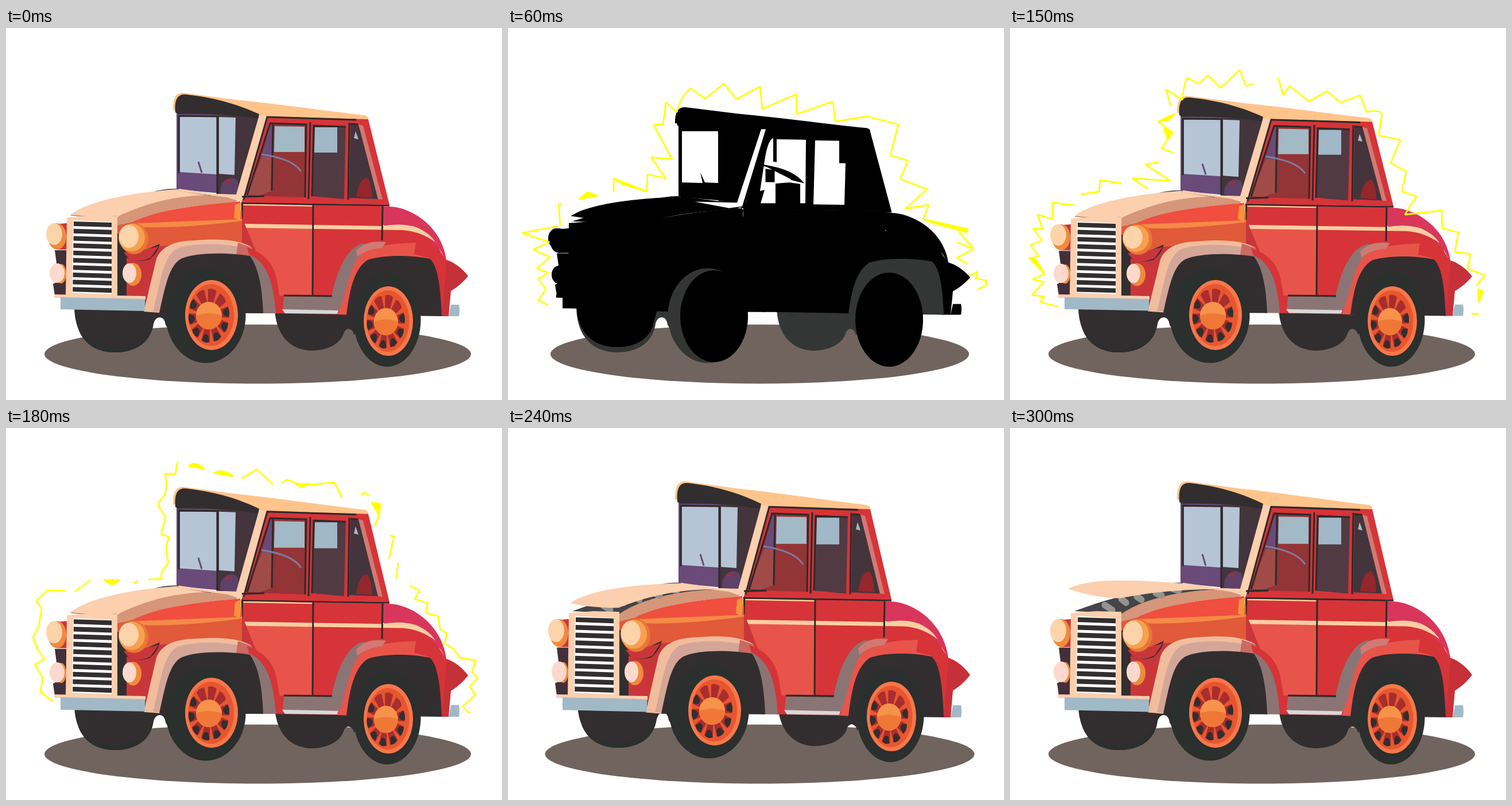
Animation, 864 px wide and 648 px high, one loop 330 ms. Source, as an HTML page:

```html
<!DOCTYPE html>
<html lang="en">
<head>
<meta charset="utf-8">
<title>Bouncing car</title>
<style>
html,body{margin:0;width:100%;height:100%;overflow:hidden;background:#fff}
svg{display:block;width:864px;height:648px}
.line{fill:none;stroke:#2e292a;stroke-width:3}
.dark{fill:#322e2f}
.peach{fill:#fccfae}
.red{fill:#d63438}
.light{fill:#e8544a}
.sky{fill:#b5c5d6}
.burst{fill:none;stroke:#ff0;stroke-width:2.8;stroke-linejoin:bevel}
.burst .solid{fill:#ff0}
#glass,.flat .rims,.blob{display:none}
.flat .blob{display:block}
.flat .far,.flat .tyre,.flat #rearArch{fill:#343635}
.flat #frontArch{fill:#000}
.shade #paint{filter:brightness(0)}
.shade #glass{display:block}
</style>
</head>
<body>
<svg id="stage" viewBox="0 0 864 648">
<ellipse id="shadow" cx="438.5" cy="568" ry="51.5" fill="#71645e"/>
<g id="farWheels">
  <path class="far dark" d="M119 484C119 540 150 565 190 565C228 565 253 546 257 515Q260 504 268 504Q276 504 278 517L292 540L300 484Z"/>
  <path class="far dark" d="M468 488C470 540 500 562 533 562C562 562 582 548 587 535Q590 524 597 524Q605 526 606 535L640 488Z"/>
  <path class="rims" d="M126 525Q148 557 190 557Q232 556 254 522C247 552 222 565 190 565Q142 565 126 525" fill="#2b2f2d"/>
  <path class="blob" d="M120 484C120 532 150 556 190 556C226 556 250 538 254 512L262 484Z"/>
</g>
<g id="body">
 <g id="paint">
  <!-- tail and doors -->
  <path fill="#c63038" d="M745 383L767 404C785 409 800 425 805 432C798 441 786 452 775 458L771 502L755 502Z"/>
  <path fill="#a1b9c6" d="M775 482H789Q791 492 789 502H771Z"/>
  <path class="red" d="M410 303L655 309V345Q725 347 757 390L768 405L759 501L590 499L470 497L411 390Z"/>
  <path fill="#d9365b" d="M656 310L668 311C705 312 760 345 767 405L755 385Q728 372 690 370L656 342Z"/>
  <path class="red" d="M656 345L690 351Q715 355 735 366L752 382L656 374Z"/>
  <path class="light" d="M411 345L534 348V466H470L411 385Z"/>
  <path fill="#fdcfa0" d="M411 341L655 345Q690 339 715 347Q738 357 748 373Q722 354 690 352L411 348ZM413 306L534 309V311L413 309Z"/>
  <path fill="#8b7574" d="M484 468L567 468C575 430 590 384 622 375L640 378C610 400 605 440 585 492H482Z"/>
  <path fill="#d8d8d8" d="M481 490L579 492L577 498L486 497Z"/>
  <path class="light" d="M578 499C592 465 596 430 610 405C625 384 650 376 714 374L740 405L600 500Z"/>
  <path fill="#cf7b74" d="M610 388C625 373 640 371 662 373L655 383C640 384 625 388 612 399Z"/>
  <path class="red" d="M714 374Q740 376 754 383L762 401L735 400L711 394Z"/>
  <path class="line" d="M411 305L668 309M535 306L534 466M656 309L655 370M412 293L410 371M484 466L568 467"/>

  <!-- hood side -->
  <path fill="#c9363a" d="M190 340L411 330L440 400L310 410L260 490H190Z"/>
  <path fill="#e15a39" d="M190 334L411 318V376L300 378L264 380L240 390L195 390Z"/>
  <path fill="#f04e3f" d="M215 335C265 318 335 307 408 302L411 333L250 341Z"/>
  <path fill="#f58a45" d="M228 340L411 333V336Q310 349 240 347Z"/>
  <path fill="#d5967a" d="M193 330C230 303 300 287 360 290L413 294L400 303C330 309 270 315 220 338L194 344Z"/>
  <path fill="#f8923c" d="M399 308L410 304L408 335L397 331Z"/>
  <path class="dark" d="M190 355L240 388L268 376Q264 392 250 403Q228 410 210 400V466H190Z"/>
  <path fill="#c9363a" d="M205 391Q240 388 266 380L252 400Q230 410 214 402Z"/>

  <!-- engine bay and lid -->
  <path fill="#454547" d="M247 288Q275 279 299 280L292 286Z"/>
  <g id="bay">
    <path fill="#454547" d="M112 327C190 299 250 288 330 288L362 291C290 294 230 308 195 331Z"/>
    <path d="M165 317L178 325M194 307L202 313M221 303L229 308M254 297L264 301M283 290L294 293" stroke="#939393" stroke-width="11" stroke-linecap="round"/>
  </g>
  <path id="lid" class="peach"/>
  <path id="seam" d="M113 326Q150 331 193 328M299 283Q325 287 357 292" fill="none" stroke="#5a4b45" stroke-width=".8"/>

  <!-- front fender -->
  <path fill="#f1bd9c" d="M240 494L262 402C270 382 290 371 330 370C370 367 402 368 427 381L420 400L310 400L268 496Z"/>
  <path fill="#d3a698" d="M256 494C270 442 272 400 298 384C330 373 380 376 405 381L410 400L310 402L274 494Z"/>
  <path fill="#ca6a62" d="M404 374L428 382L434 399L401 395Z"/>
  <path class="red" d="M420 382Q462 396 471 435L482 497H466L440 420L424 396Z"/>
  <path fill="#8b7574" d="M424 395C450 406 466 435 470 497H444L434 430Z"/>

  <!-- lamps, grille, bumper -->
  <path fill="#c9363a" d="M82 342L106 340V386H88Z"/>
  <path fill="#41303a" d="M85 387H108V466H85L82 446L92 440Z"/>
  <ellipse cx="89" cy="363" rx="16" ry="23" fill="#f08a3c"/>
  <ellipse cx="84" cy="359" rx="14" ry="19" fill="#fdd3a9"/>
  <ellipse cx="96" cy="428" rx="9" ry="17" fill="#f08a3c"/>
  <ellipse cx="89" cy="427" rx="13" ry="17" fill="#fcd9cc"/>
  <path class="peach" d="M106 330L150 327L194 328V467L104 466Z"/>
  <g id="grille"></g>
  <ellipse cx="223" cy="367" rx="25" ry="27" fill="#e87735"/>
  <ellipse cx="219" cy="365" rx="23" ry="24" fill="#f8a050"/>
  <ellipse cx="214" cy="363" rx="17" ry="20" fill="#fdd3a9"/>
  <ellipse cx="221" cy="429" rx="15" ry="20" fill="#f08a3c"/>
  <ellipse cx="215" cy="427" rx="12" ry="17" fill="#fcd9cc"/>
  <path class="peach" d="M84 464L243 467V473L84 470Z"/>
  <path fill="#a1b9c6" d="M95 469L242 472V493L95 490Z"/>

  <!-- cabin front -->
  <path fill="#6a4a79" d="M297 146L440 153L405 291L297 281Z"/>
  <path fill="#44343b" d="M369 152L441 153L404 291L369 289Z"/>
  <path class="sky" d="M303 155H367V255L303 251ZM371 155L400 156L398 256L371 254Z"/>
  <path fill="#5e4168" d="M373 288C371 265 391 255 403 265L407 280L402 291Z"/>
  <ellipse cx="387" cy="267" rx="4" ry="3" fill="#a62b36"/>
  <path class="line" d="M301 253V153L370 154M368 153V289"/>
  <path d="M335 233L341 252" stroke="#6a4a79" stroke-width="3"/>
  <path fill="#fec48b" d="M291 143C291 121 296 113 309 113L400 125C480 133 560 145 625 152Q632 154 631 160L455 154L440 153Z"/>
  <path class="dark" d="M295 147C293 124 299 114 315 116C370 122 408 135 441 150L439 158C400 152 350 149 300 150Z"/>

  <!-- cabin side -->
  <path class="red" d="M453 154L631 159L668 308L411 304Z"/>
  <path class="peach" d="M441 152L455 154L411 303L385 295L300 284L301 280L365 289L401 290Z"/>
  <path fill="#933436" d="M461 167L523 169L521 295L419 292Z"/>
  <path fill="#a04b48" d="M446 224L463 225V284L440 292L419 290Z"/>
  <path fill="#6a4a79" d="M460 170L464 169V225L446 224Z"/>
  <path fill="#a2b9c6" d="M468 171L520 172V216H467Z"/>
  <path fill="#523a42" d="M537 171L592 172L589 298L532 293Z"/>
  <path fill="#a0b8c8" d="M538 173H577V217H537Z"/>
  <path fill="#44343b" d="M600 166L614 168L650 298L598 296Z"/>
  <path fill="#93272c" d="M610 294Q615 262 629 261Q637 268 638 296Z"/>
  <path fill="#a2b9c6" d="M609 180L614 194L606 192Z"/>
  <path fill="#cf7b74" d="M614 168L622 170L656 299L648 298Z"/>
  <path class="line" d="M414 299L455 155L610 160M465 168L463 284M598 165L596 299M530 164L527 298"/>
  <path class="line" stroke-width="2" d="M420 291L460 166L523 168L521 295M533 293L536 170L592 172M600 167L613 168M411 294L450 293"/>
  <path d="M445 220Q500 228 514 250" fill="none" stroke="#82789c" stroke-width="3"/>
 </g>
 <g id="glass" fill="#fff">
  <path d="M303 158H366V255L343 254L335 235L339 255L303 254ZM325 290L399 292L441 154H449L408 299L385 302ZM468 173L519 174L518 293H509V257L490 254L466 256V293H440L447 268L439 270L446 220Q452 173 462 171V215L468 216ZM535 175L577 176V218H588L586 296L532 295Z"/>
  <path d="M445 222Q494 230 512 253L493 248M450 230L463 232V252H450Z" stroke="#000" stroke-width="3" fill="#000"/>
 </g>
 <path id="frontArch" class="dark" d="M267 496C279 440 286 413 305 402C330 390 390 391 425 397C440 418 446 450 448 497Z"/>
 <path id="rearArch" class="dark" d="M593 500C598 460 605 420 630 404C655 395 705 395 738 402C752 413 757 450 759 502Z"/>
</g>
<g id="nearWheels">
  <ellipse class="tyre" cx="348" cy="501" rx="69.5" ry="82.5" fill="#2b2f2d"/>
  <ellipse class="tyre" cx="664" cy="508" rx="58.5" ry="82" fill="#2b2f2d"/>
  <g class="rims" id="rims"></g>
  <ellipse class="blob" cx="359" cy="502" rx="59" ry="80"/>
  <ellipse class="blob" cx="664" cy="508" rx="59" ry="82"/>
</g>
<g class="burst">
  <path d="M294 147L275 129L270 168L254 169L286 229L249 225L275 262L243 255L242 285L184 262V285M294 147Q300 120 318 105L343 123L376 97L398 124Q420 112 439 102L443 141L503 115V150L566 128L570 163L625 154L680 168L666 222L697 231L683 263L730 281L692 315L733 308L723 333M785 354L811 385L782 373M811 385L782 400L800 411M804 432L818 424L815 436L834 440L833 448L817 456M91 344L88 307L94 306M87 345L25 357L72 373L44 386L73 399L50 419L70 426L53 437L66 455L53 474L70 483"/>
  <path class="solid" d="M124 298L138 286L156 292ZM723 333L800 350V356L738 339ZM184 262L242 285L200 272Z"/>
</g>
<g class="burst">
  <path d="M280 136L272 107L300 125Q304 90 309 87L329 97L345 82L367 104L400 73L411 101L424 97M467 87L476 117L487 101L521 128L552 110L576 130L610 117L621 146Q645 142 648 150L642 187L680 195L663 235L690 250L683 285L708 293L688 325L752 318L753 349L781 356L775 390L802 394L797 419L827 431L812 449M804 498H817M286 150L258 163L283 182L264 210L284 217M260 233L236 238L279 266L213 262L240 280M195 271L157 265L155 285L123 290M112 309L74 304V333L48 325L57 350L40 349L56 370L36 378L50 397L33 402M60 428L39 438L59 442L38 465L60 468L53 478L83 485"/>
  <path class="solid" d="M815 455L824 458L817 478ZM268 175L283 182L275 194ZM33 400L45 403L60 428ZM258 163L287 150L276 161Z"/>
</g>
<g class="burst">
  <path d="M299 58L295 80L277 80Q283 105 274 120Q262 130 268 140L278 155L270 185L285 190Q275 205 283 235Q265 255 272 263L248 264M410 88L437 72L465 98M480 95L490 90L515 100L572 95L586 122M618 117L625 112L632 118M650 152L642 172M668 187L676 189L667 228M683 235L680 262M704 275L720 283L712 298L735 305L731 322L753 328L756 350L768 358L764 375L780 385L790 400L818 405L812 425L822 435L808 450L818 465L795 485L808 497M230 266L222 271M147 265L120 285M103 284L72 283L53 301L62 315L57 345L47 365L55 385L67 403L50 412L64 435L60 460L82 476"/>
  <path class="solid" d="M318 66Q330 57 345 71ZM362 78Q378 70 396 84ZM637 130L652 132L650 152ZM170 265H198L185 273ZM505 98L530 97L515 103Z"/>
</g>
</svg>
<script>
const $ = id => document.getElementById(id);
const bursts = document.querySelectorAll('.burst');

$('grille').innerHTML = '<path fill="#fff" d="M117 335L184 338V464L115 461Z"/>' +
  Array.from({length: 10}, (_, i) => {
    const x = 118 - i * .2, y = 337 + i * 12.7;
    return `<path class="dark" d="M${x} ${y}L184 ${y + 2}v8L${x} ${y + 8}Z"/>`;
  }).join('');

function rim(cx, cy, rx, ry) {
  const holes = Array.from({length: 10}, (_, i) => {
    const top = i < 2 || i > 8;
    const cap = top ? '' : '<path class="dark" d="M-9 -45Q0 -50 9 -45L5 -35Q0 -31 -5 -35Z"/>';
    return `<g transform="rotate(${i * 36 + 10})">
      <path fill="#a72d2f" d="M-10 -45Q0 -50 10 -45L6 -22H-6Z"/>${cap}</g>`;
  }).join('');
  return `<g transform="translate(${cx} ${cy}) scale(${rx / 61} ${ry / 61})">
    <circle r="61" fill="#f6774a"/>
    <ellipse cx="-1" rx="53" ry="54" fill="#e8562f"/>
    <g transform="translate(-6 1)">${holes}
      <ellipse rx="30" ry="24" fill="#f6924a"/>
      <path d="M-30 0Q0 -8 30 0C28 32 -28 32 -30 0" fill="#ef7836"/>
    </g></g>`;
}
$('rims').innerHTML = rim(358, 500, 46, 61) + rim(666, 510.5, 43, 60.5);

const base = {sx: 1, sy: 1, dy: 0, wx: 0, wy: 0, lift: 0, shadow: 371.5, burst: -1, look: ''};
const poses = [
  {at: 0},
  {at: 60, sy: .929, lift: 9, shadow: 364.5, burst: 0, look: 'flat shade'},
  {at: 120, sx: 1.011, sy: .925, dy: 6, lift: 14, shadow: 364.5, burst: 1, look: 'flat'},
  {at: 150, sy: .985, burst: 1},
  {at: 180, sy: 1.03, wy: -4, burst: 2},
  {at: 210, sy: 1.057, wx: 2, wy: -8, shadow: 374, burst: 2},
  {at: 240, sy: 1.057, wx: 2, wy: -8, lift: 12, shadow: 374},
  {at: 270, sy: 1.057, wy: -6, lift: 26},
  {at: 300, sy: 1.057, wy: -4, lift: 36}
].map(pose => ({...base, ...pose}));

function lidPath(d) {
  return `M${112 - d * .3} ${326 - d}C135 ${306 - d * .9} 200 ${288 - d * .4} 297 281L365 291
    C290 290 235 ${309 - d * .3} 193 ${329 - d * .65}Q150 ${331 - d * .7} ${112 - d * .3} ${326 - d}Z`;
}

function show(p) {
  $('stage').setAttribute('class', p.look);
  $('body').setAttribute('transform',
    `translate(449 ${466 + p.dy}) scale(${p.sx} ${p.sy}) translate(-449 -466)`);
  for (const id of ['farWheels', 'nearWheels'])
    $(id).setAttribute('transform', `translate(${p.wx} ${p.wy})`);
  $('shadow').setAttribute('rx', p.shadow);
  $('lid').setAttribute('d', lidPath(p.lift));
  $('bay').style.display = p.lift ? '' : 'none';
  $('seam').style.display = p.lift ? 'none' : '';
  bursts.forEach((b, i) => b.style.display = i === p.burst ? '' : 'none');
}

let current;
function tick() {
  const time = performance.now() % 330;
  const pose = poses.findLast(p => p.at <= time);
  if (pose !== current) show(current = pose);
  requestAnimationFrame(tick);
}
tick();
</script>
</body>
</html>
```
